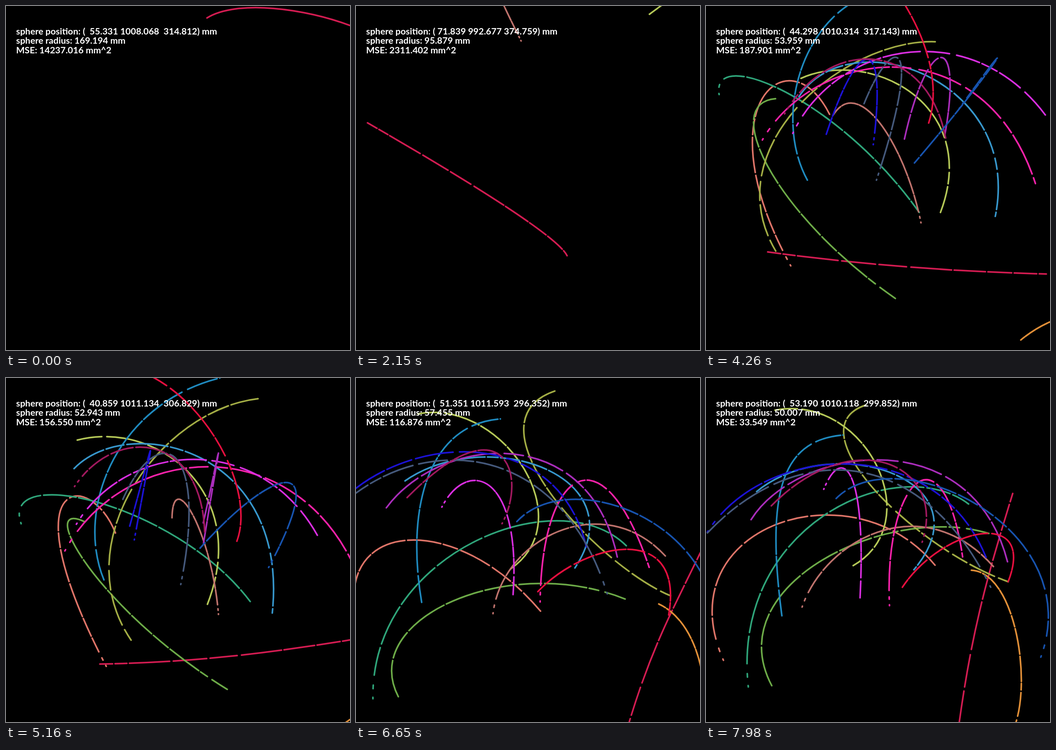
These frames come from a looping animation (748 by 748 pixels, 8 s). An HTML page:

```html
<!DOCTYPE html>
<html lang="en">
<head>
<meta charset="utf-8">
<title>Sphere fit</title>
<style>
  html, body { margin: 0; width: 100%; height: 100%; overflow: hidden; background: #000; }
  svg { position: absolute; left: 0; top: 0; width: 748px; height: 748px; }
  path { fill: none; stroke-width: 3.5; stroke-linecap: round; }
  #info {
    position: absolute; left: 22px; top: 44.8px; white-space: pre; color: #fff;
    font: 700 19.7px/20.5px Lato, "Open Sans", sans-serif;
  }
</style>
</head>
<body>
<svg id="stage"></svg>
<div id="info"></div>
<script>
const LOOP = 8000;
const KEY_TIMES = [680, 1380, 1750, 2150, 3290, 5160, 5950, 7370, 7800];
const stage = document.getElementById('stage');
const info = document.getElementById('info');
const curves = [];

// The picture refreshes in bursts: first moment, last moment, count
const bursts = [
  [0], [160, 370, 5], [680], [1050, 1380, 10], [1750], [2150], [2490], [2800, 2890, 3],
  [3140, 3290, 4], [3380, 3680, 7], [3870, 4390, 11], [4550, 5160, 10], [5190, 5310, 3],
  [5370, 5550, 5], [5830, 5950, 4], [5980, 6310, 7], [6530, 7310, 20], [7340, 7370, 2],
  [7430, 7800, 12]
];
const steps = bursts.flatMap(([a, b = a, n = 1]) =>
  Array.from({ length: n }, (_, i) => a + (b - a) * i / Math.max(1, n - 1)));

const parse = s => s.split(/[ ,]+/).map(Number);
const lift = (pose, dy) => pose.map((v, i) => i % 2 ? v + dy : v);

function random(seed) {
  return () => (seed = (seed * 16807) % 2147483647) / 2147483647;
}

// Broken stroke in thousandths of its length; one end may fade out in dots
function dashes(seed, dotted) {
  const rnd = random(seed * 7919 + 13);
  const out = dotted ? [4, 24, 10, 28] : [];
  let sum = dotted ? 66 : 0;
  while (sum < 900) {
    const on = 30 + 130 * rnd(), off = 9 + 16 * rnd() ** 4;
    out.push(on, off);
    sum += on + off;
  }
  out.push(Math.max(4, 1000 - sum));
  if (dotted === 'end') out.reverse();
  return [...out, 9].map(v => v.toFixed(1)).join(' ');
}

function add(color, pattern, keys, from, to = LOOP) {
  const el = document.createElementNS('http://www.w3.org/2000/svg', 'path');
  el.setAttribute('stroke', color);
  el.setAttribute('pathLength', 1000);
  if (pattern) el.setAttribute('stroke-dasharray', pattern);
  stage.append(el);
  curves.push({ el, keys, from, to });
}

// Poses belong to the latest key times; by default a curve drops in from above
function curve(color, dotted, ...poses) {
  const p = poses.map(parse);
  if (p.length === 5) p.unshift(lift(p[0], -650));
  const times = KEY_TIMES.slice(-p.length);
  add(color, dashes(curves.length + 1, dotted), p.map((v, i) => [times[i], v]), times[0]);
}

function mix(keys, t) {
  const i = Math.max(0, keys.findLastIndex(k => k[0] <= t));
  const [t0, a] = keys[i], [t1, b] = keys[Math.min(i + 1, keys.length - 1)];
  const k = t1 > t0 ? Math.max(0, (t - t0) / (t1 - t0)) : 0;
  return a.map((v, j) => v + (b[j] - v) * k);
}

// Cubic that passes through four points at 0, 1/3, 2/3 and 1
function cubic(p) {
  const handle = (a, b, c, d) => (-5 * p[a] + 18 * p[b] - 9 * p[c] + 2 * p[d]) / 6;
  const h = [handle(0, 2, 4, 6), handle(1, 3, 5, 7), handle(6, 4, 2, 0), handle(7, 5, 3, 1)];
  return `M${p[0]} ${p[1]}C${h.map(v => v.toFixed(2))},${p[6]},${p[7]}`;
}

// Rim arc of the opening, then the line that sweeps down in its place
add('#d41c52', '', [[0, parse('437,26 525,4 640,13 752,44')]], 0, 680);
curve('#d41c52', '',
  '150,20 290,70 430,125 545,176', '20,10 200,60 360,110 490,172',
  '9,180 210,290 400,400 570,489', '25,254 200,357 370,466 459,543',
  '63,446 265,502 470,554 679,605', '204,622 400,613 590,593 800,561',
  '615,1065 655,700 690,510 739,356', '440,886 550,721 655,564 760,407',
  '525,960 561,680 604,470 667,251');
// orange
curve('#e18f38', '',
  '633,950 690,910 760,882 860,862',
  '633,700 690,660 760,632 860,612', '735,752 780,725 830,708 880,700',
  '628,483 690,525 742,620 772,760', '693,501 735,550 757,630 745,760',
  '577,418 653,488 685,632 668,765');
// salmon
curve('#de7468', 'end',
  '300,132 170,71 88,235 150,502', '238,337 160,257 114,335 218,627',
  '411,492 235,374 70,370 -40,425', '390,524 190,364 38,366 38,570',
  '498,407 270,298 60,382 38,614');
// green
curve('#6dab48', '',
  '341,594 150,395 72,210 130,88', '481,677 250,493 140,345 172,313',
  '581,460 320,450 115,575 72,755', '590,504 330,456 135,500 115,622',
  '615,338 370,345 165,470 143,669');
// teal
curve('#2fa57a', 'end',
  '395,411 220,180 85,56 24,66', '531,486 320,318 105,254 33,317',
  '577,361 360,322 140,475 55,748', '600,369 400,308 150,394 16,640',
  '571,274 370,247 165,386 92,672');
// olive
curve('#a3ad45', '',
  '448,111 230,140 42,280 29,495', '548,45 350,145 232,345 272,570',
  '422,46 385,150 555,308 750,411', '444,8 360,170 445,385 608,545',
  '347,59 312,165 450,322 657,443');
// yellow-green
curve('#b5c858', '',
  '800,-120 740,-60 690,-20 638,18',
  '259,180 420,149 565,228 583,405', '155,135 325,153 445,280 438,492',
  '143,98 300,132 388,255 323,384', '125,55 305,118 401,290 352,450',
  '150,70 318,120 393,270 320,408');
// rosy
curve('#be726c', 'end',
  '240,-180 285,-80 322,0 359,76',
  '189,171 300,172 400,275 473,428', '361,304 385,268 430,355 462,514',
  '708,393 530,321 365,378 283,511', '632,380 510,314 385,368 315,514',
  '625,410 460,323 305,371 209,498');
// light blue
curve('#3797cc', '',
  '257,198 430,101 630,195 680,403', '148,197 320,144 510,242 579,511',
  '121,254 330,193 478,248 455,378', '90,189 290,150 482,245 500,453',
  '110,247 310,187 474,256 452,417');
// blue
curve('#1f8abf', '',
  '228,317 178,195 175,65 205,-35', '213,439 200,270 285,105 465,0',
  '133,486 124,280 165,150 251,102', '154,490 152,310 225,152 386,74',
  '165,517 155,290 200,167 298,124');
// hot pink
curve('#f822aa', 'start',
  '117,205 300,78 530,115 682,377', '128,376 310,217 550,212 750,395',
  '488,486 483,268 525,235 602,414', '300,488 393,272 540,228 678,409',
  '399,495 425,280 495,226 558,389');
// magenta
curve('#d92ee0', 'start',
  '225,235 365,65 580,17 800,130', '153,318 310,193 510,195 677,342',
  '203,283 248,228 282,268 273,470', '168,278 265,217 368,294 420,472',
  '256,242 298,196 330,270 335,478');
// purple
curve('#aa2dbb', '',
  '434,263 515,85 595,78 610,205', '429,315 458,180 459,181 429,362',
  '10,258 200,161 415,184 571,400', '130,310 275,188 465,208 567,388',
  '98,308 270,192 500,204 657,405');
// deep blue
curve('#1c12d6', 'start',
  '450,250 425,100 348,84 254,235', '279,352 311,178 308,178 269,322',
  '-110,260 90,158 330,174 508,378', '6,335 180,194 385,197 493,355',
  '3,335 190,202 430,211 609,390');
// slate
curve('#45597c', 'start',
  '361,307 458,90 470,65 435,160', '380,449 392,225 335,165 254,264',
  '543,465 385,228 175,175 -20,226', '550,474 410,254 205,184 -10,303',
  '619,455 435,241 215,208 3,337');
// dark magenta
curve('#a2195f', 'start',
  '193,233 335,93 495,98 612,238', '149,236 260,154 375,183 432,335',
  '339,333 348,225 255,150 57,227', '293,298 322,188 288,165 173,298',
  '470,357 450,222 320,180 142,278');
// royal blue
curve('#1753ae', 'end',
  '485,312 620,100 635,-20 530,30', '422,370 560,246 630,245 571,412',
  '348,314 510,270 700,350 800,560', '352,310 510,261 690,357 775,560',
  '283,262 480,229 688,362 728,607');
// red
curve('#e60f3f', '',
  '490,-150 489,-30 484,60 466,152', '250,-25 395,55 492,205 502,355',
  '513,562 610,455 705,428 720,542', '261,353 420,304 575,339 634,485',
  '427,455 540,357 645,345 657,443');

// Time, then x, y, z, radius and squared error, which decays exponentially
const fit = [
  [0, 55.331, 1008.068, 314.812, 169.194, 14237.016],
  [2150, 71.839, 992.677, 374.759, 95.879, 2311.402],
  [3290, 47.804, 1009.478, 327.658, 54.995, 226.331],
  [5160, 40.859, 1011.134, 306.829, 52.943, 156.55],
  [5950, 53.424, 1013.39, 294.526, 60.187, 170.115],
  [7370, 48.978, 1009.536, 298.443, 54.328, 76.054],
  [7800, 53.19, 1010.118, 299.852, 50.007, 33.549]
].map(([t, x, y, z, r, e]) => [t, [x, y, z, r, Math.log(e)]]);

function label(t) {
  const v = mix(fit, t);
  const pos = v.slice(0, 3).map(n => n.toFixed(3));
  const width = Math.max(...pos.map(s => s.length));
  return `sphere position: (${pos.map(s => s.padStart(width)).join(' ')}) mm\n` +
    `sphere radius: ${v[3].toFixed(3)} mm\nMSE: ${Math.exp(v[4]).toFixed(3)} mm^2`;
}

let shown = -1;
function draw() {
  const now = performance.now() % LOOP;
  const t = steps.findLast(s => s <= now + 0.01);
  if (t !== shown) {
    shown = t;
    for (const { el, keys, from, to } of curves) {
      const on = t >= from && t < to;
      el.style.display = on ? '' : 'none';
      if (on) el.setAttribute('d', cubic(mix(keys, t)));
    }
    info.textContent = label(t);
  }
  requestAnimationFrame(draw);
}
draw();
</script>
</body>
</html>
```
